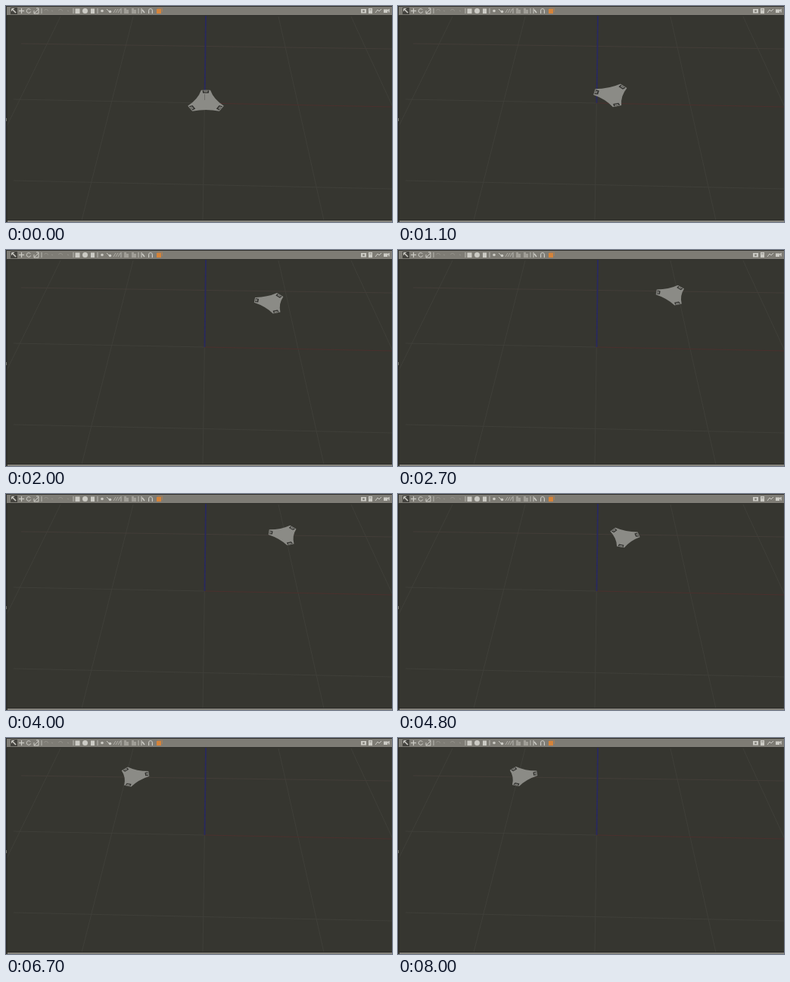
Write an HTML page with a canvas that moves like this. It is 510 px wide and 287 px high and loops after 8.1 s.

```html
<!DOCTYPE html>
<html lang="en">
<head>
<meta charset="utf-8">
<title>Robot simulation</title>
<style>
html, body { margin: 0; width: 100%; height: 100%; overflow: hidden; background: #363630; }
canvas { display: block; }
</style>
</head>
<body>
<canvas id="stage" width="510" height="287"></canvas>
<script>
const ctx = document.getElementById('stage').getContext('2d');
const LOOP = 8100, TICK = 100;
const BODY = '#8b8b86', DARK = '#30302d', BAR = '#7e7c75', ICON = '#cbcac4', FAINT = '#94928b';

// places the robot drives between
const home = { x: 264, y: 128, angle: 90 };
const right = { x: 367.5, y: 54, angle: 46 };
const left = { x: 163, y: 50, angle: 14 };

function line(color, width, ...p) {
  ctx.strokeStyle = color;
  ctx.lineWidth = width;
  ctx.beginPath();
  for (let i = 0; i < p.length; i += 2) ctx.lineTo(p[i], p[i + 1]);
  ctx.stroke();
}

function rect(color, x, y, w, h) {
  ctx.fillStyle = color;
  ctx.fillRect(x, y, w, h);
}

function disc(color, x, y, r) {
  ctx.fillStyle = color;
  ctx.beginPath();
  ctx.arc(x, y, r, 0, 7);
  ctx.fill();
}

function arc(color, x, y, r, from, to) {
  ctx.strokeStyle = color;
  ctx.lineWidth = 1;
  ctx.beginPath();
  ctx.arc(x, y, r, from, to);
  ctx.stroke();
}

function ground() {
  const grid = '#3f3f39';
  rect('#363630', 0, 0, 510, 287);
  for (let i = -2; i <= 2; i++) line(grid, 1, 264 + i * 96, 14, 260 + i * 160, 285);
  line('#433d38', 1, 20, 50, 510, 57);
  line(grid, 1, 10, 124, 262, 129);
  line(grid, 1, 10, 232, 510, 243);
  line('#4b302d', 1, 262, 129, 510, 134);
  line('#29295f', 1.8, 264, 13, 262.5, 129);
}

function toolbar() {
  rect('#30302c', 0, 0, 510, 13);
  rect(BAR, 1, 1, 509, 11);
  rect('#292926', 0, 13, 1.5, 272);
  rect('#77776f', 0, 149, 1, 4);
  rect('#2b2b28', 0, 284, 510, 1);
  rect('#85837c', 2, 285, 508, 2);

  // pointer, move, rotate, scale
  rect('#45443f', 6, 2, 9, 9);
  line(ICON, 1.6, 8, 4, 13, 9);
  line(ICON, 1, 7.5, 7, 7.5, 3.5, 11, 3.5);
  line(ICON, 1.2, 17, 6.5, 24, 6.5);
  line(ICON, 1.2, 20.5, 3, 20.5, 10);
  arc(ICON, 30, 6.5, 2.8, .3, 5.8);
  line(ICON, 1, 37, 10, 43, 4);
  line(ICON, 1, 37, 6, 37, 10, 43, 10, 43, 3, 40, 3);

  // separators, undo and redo
  for (const x of [47, 89, 121, 152, 175]) line(ICON, .8, x, 3, x, 10);
  for (const x of [53, 72]) arc(FAINT, x, 7, 2.6, 3.4, 6.2);
  for (const x of [61, 82]) line(FAINT, 1, x - 1, 6, x + 1, 7);

  // shapes and lights
  rect(ICON, 91.5, 3.5, 6, 6.5);
  disc(ICON, 104.5, 6.5, 3.5);
  rect(ICON, 112, 3.5, 5, 6.5);
  disc(ICON, 127, 6.5, 1.8);
  line(ICON, 1, 133, 4, 136, 7);
  disc(ICON, 137.5, 7.5, 1.8);
  for (const x of [142, 145, 148]) line('#bdbbb4', .8, x, 9, x + 3, 4);

  // copy, paste, align, snap, view
  for (const x of [156, 166]) {
    rect('#a09e97', x, 3, 3, 7);
    rect('#a09e97', x + 3, 5, 3, 5);
  }
  line(ICON, 1, 179, 3, 179, 10);
  line(ICON, 1.6, 180, 5, 183, 9);
  arc(ICON, 191, 6, 2.4, Math.PI, 0);
  for (const x of [188.6, 193.4]) line(ICON, 1.2, x, 6, x, 10);
  rect('#d5833a', 199, 4, 6, 6);
  line('#a87f58', 1, 200, 3, 206.5, 3, 206.5, 8);

  // camera, log, plot, video
  rect(ICON, 469, 4, 7, 5.5);
  disc(BAR, 472.5, 6.8, 1.4);
  rect(ICON, 479, 3, 5, 7);
  line(BAR, .8, 480, 5, 483, 5);
  line(ICON, 1, 488, 9, 491, 5, 493, 7, 496, 4);
  rect(ICON, 499, 4.5, 5, 4.5);
  line(ICON, 1.4, 503, 6.5, 506, 5, 506, 8.5);
}

function robot({ x, y, angle }) {
  const size = .72 + .0022 * y, depth = size * .68;
  const lean = (x - 262) / (y + 430); // follows the receding grid lines
  const third = Math.PI * 2 / 3;
  ctx.save();
  ctx.transform(size, 0, lean * depth, depth, x, y);
  ctx.rotate(-angle * Math.PI / 180);

  // three blunt corners joined by hollow sides
  ctx.fillStyle = BODY;
  ctx.beginPath();
  for (let i = 0; i < 3; i++) {
    const a = i * third;
    const at = (turn, along, across) => {
      const c = Math.cos(a + turn), s = Math.sin(a + turn);
      return [along * c - across * s, along * s + across * c];
    };
    ctx.lineTo(...at(0, 24, -6));
    ctx.lineTo(...at(0, 24, 6));
    ctx.quadraticCurveTo(...at(third / 2, 12, 0), ...at(third, 24, -6));
  }
  ctx.fill();

  // wheel wells
  for (let i = 0; i < 3; i++) {
    line(DARK, 1.8, 23, -3.5, 19, -3, 19, 3, 23, 3.5);
    rect('#6d6d68', 20.5, -1.8, 3.5, 3.6);
    ctx.rotate(third);
  }
  ctx.restore();
  if (y > 120) line('#6c6b67', 1, 262.5, y - 11, 262.5, y - 3);
}

// turn on the spot, then glide towards the goal with exponential settling
function drive(from, to, t, start) {
  const u = Math.max(0, t - start);
  const rest = Math.exp(-(u ** 3 / (u * u + 180 ** 2)) / 620);
  const k = Math.min(1, Math.max(0, (t - start + 500) / 750));
  return {
    x: to.x + (from.x - to.x) * rest,
    y: to.y + (from.y - to.y) * rest + 20 * rest * (1 - rest),
    angle: from.angle + (to.angle - from.angle) * k * k * (3 - 2 * k)
  };
}

function draw(now) {
  const t = Math.floor(now % LOOP / TICK) * TICK;
  ground();
  robot(t < 3900 ? drive(home, right, t, 890) : drive(right, left, t, 4470));
  toolbar();
  requestAnimationFrame(() => draw(performance.now() - start));
}

const start = performance.now();
draw(0);
</script>
</body>
</html>
```
